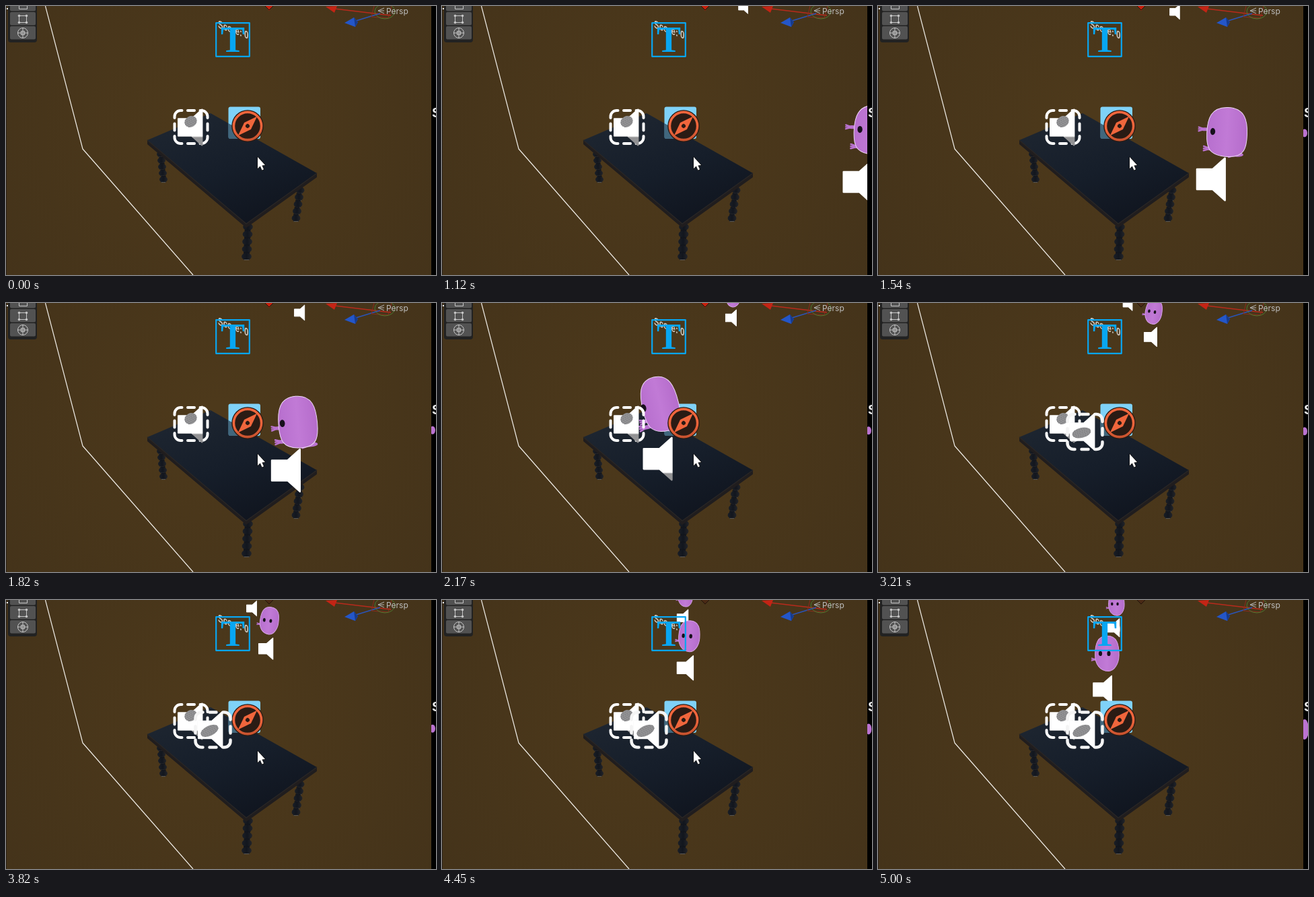
These frames come from a looping animation (639 by 399 pixels, 5060 ms). An HTML page with a canvas:

```html
<!DOCTYPE html>
<html lang="en">
<head>
<meta charset="utf-8">
<title>Scene view</title>
<style>
  html, body { margin: 0; width: 100%; height: 100%; overflow: hidden; background: #000; }
  canvas { display: block; }
</style>
</head>
<body>
<canvas id="stage" width="639" height="399"></canvas>
<script>
const W = 639, H = 399, LOOP = 5060, EDGE = 632;
const CAUGHT = 2230, CURSOR_GONE = 4500;
const SKIN = '#bb73d1', BLUE = '#08a6f2', ORANGE = '#f0663c';
const c = document.getElementById('stage').getContext('2d');

const clamp = (v, a = 0, b = 1) => Math.min(b, Math.max(a, v));
const mix = (a, b, k) => a + (b - a) * k;
const quad = (s, a, b, k) => a + b * s + k * s * s;

function trace(points, close = true) {
  c.beginPath();
  points.forEach(([x, y]) => c.lineTo(x, y));
  if (close) c.closePath();
}

function poly(points, fill) {
  trace(points);
  c.fillStyle = fill;
  c.fill();
}

function line(points, color, width = 1) {
  trace(points, false);
  c.strokeStyle = color;
  c.lineWidth = width;
  c.stroke();
}

function box(x, y, w, h, r, fill) {
  c.beginPath();
  c.roundRect(x, y, w, h, r);
  c.fillStyle = fill;
  c.fill();
}

function oval(x, y, rx, ry, fill, turn = 0) {
  c.beginPath();
  c.ellipse(x, y, rx, ry, turn, 0, 7);
  c.fillStyle = fill;
  c.fill();
}

function ring(x, y, rx, ry, color, width = 1) {
  c.beginPath();
  c.ellipse(x, y, rx, ry, 0, 0, 7);
  c.strokeStyle = color;
  c.lineWidth = width;
  c.stroke();
}

function ramp(x0, y0, x1, y1, ...stops) {
  const g = c.createLinearGradient(x0, y0, x1, y1);
  stops.forEach((s, i) => g.addColorStop(i / (stops.length - 1), s));
  return g;
}

function within(path, paint) {
  c.save();
  c.beginPath();
  path();
  c.clip();
  paint();
  c.restore();
}

// White above the cut, dimmed where the table hides it.
const dimBelow = y => ramp(0, y - 1, 0, y + 1, '#fff', '#929294');

function backdrop() {
  const g = c.createRadialGradient(320, 165, 20, 320, 200, 390);
  g.addColorStop(0, '#4d391b');
  g.addColorStop(1, '#44331a');
  c.fillStyle = g;
  c.fillRect(0, 0, EDGE, H);
  c.fillStyle = '#2a2118';
  c.fillRect(0, 0, 1, H);
  line([[58.5, 0], [114, 212], [278, 399]], '#efece6', 1.2);
}

function toolbar() {
  const ink = '#c6c6c6';
  box(3, -6, 43, 60, 4, '#222');
  for (let y = -12; y < 40; y += 21) box(6, y, 38, 19.5, 2, '#525252');
  c.strokeStyle = ink;
  c.lineWidth = 1;
  c.strokeRect(19.5, -5.5, 12, 10);
  c.strokeRect(19.5, 14.5, 11, 10);
  for (const x of [19.5, 30.5]) for (const y of [14.5, 24.5]) oval(x, y, 1.8, 1.8, ink);
  ring(25, 40, 7.5, 7.5, ink);
  line([[17, 40], [33, 40]], ink);
  line([[25, 32], [25, 48]], ink);
  c.strokeRect(22.5, 37.5, 5, 5);
  c.fillStyle = '#fff';
  c.fillRect(1, 3, 2, 2);
}

function axes(t) {
  poly([[385, 0], [397, 0], [391, 7]], t < 2300 ? '#c8200c' : '#4a2a15');
  line([[385, 0], [391, 6], [397, 0]], '#21140c');
  line([[488, 4], [572, 14]], '#b82a1c', 1.6);
  poly([[475, 1], [492, 0], [488, 10]], '#c42415');
  line([[520, 22], [556, 11]], '#2a54b8', 1.6);
  poly([[503, 25], [517, 17], [523, 24], [519, 31]], '#2456c8');
  poly([[517, 17], [523, 24], [519, 31]], '#173b8c');
  line([[547, 0], [543, 16], [568, 18], [573, 0]], '#8c2c1c');
  ring(563, 8, 15, 11, '#4d7a30');
  line([[562, 3], [553, 7], [562, 11]], '#b5b5b5');
  line([[553, 7], [562, 7]], '#b5b5b5');
  c.font = '12px Inter, Arial, sans-serif';
  c.fillStyle = '#bdbdbd';
  c.fillText('Persp', 565, 11.5);
}

// Turned leg: a leaning stack of beads, each with a worn lower rim.
function leg(x, lean, top, bottom, r) {
  const n = 5, gap = (bottom - top) / n;
  for (let i = 0; i < n; i++) {
    const bx = x + lean * i / (n - 1), y = top + gap * (i + .5);
    c.fillStyle = '#12151c';
    c.fillRect(bx - r * .55, y - gap * .6, r * 1.1, gap * 1.1);
    oval(bx, y, r * .92, gap * .48, ramp(bx - r, 0, bx + r, 0, '#1b1f26', '#12161e', '#242529'));
    line([[bx - r * .5, y + gap * .46], [bx + r * .5, y + gap * .46]], '#5f5a54');
  }
}

const TOP = [[210, 199], [304, 159], [462, 248], [357, 323]];

function table() {
  leg(230, 4, 215, 262, 6.5);
  leg(437, -6, 268, 320, 7);
  leg(359.5, -2, 322, 377, 8);
  const [left, , right, front] = TOP;
  const lower = ([x, y]) => [x, y + 6];
  c.lineJoin = 'round';
  poly([left, right, lower(right), lower(front), lower(left)], '#201d1e');
  poly(TOP, ramp(300, 160, 360, 325, '#1d2530', '#161e2a', '#10151f'));
  line([left, front, right], '#292625', 1.5);
}

function wisp(x, y, len, color) {
  oval(x, y, len, len * .35, color);
  for (const dy of [-.4, 0, .4]) {
    line([[x, y], [x - len * 1.3, y + dy * len]], color, len * .3);
  }
}

function ghost({ x, y, h, tilt = 0, w, foot, eyes, limbs, rim }) {
  c.save();
  c.translate(x, y);
  c.rotate(tilt);
  c.scale(h, h);
  c.lineCap = 'round';
  limbs.forEach(l => wisp(...l, SKIN));
  c.beginPath();
  c.moveTo(0, -.5);
  c.bezierCurveTo(w * .85, -.5, w, -.25, w, .04);
  c.bezierCurveTo(w, .3, foot, .5, .04, .5);
  c.bezierCurveTo(-foot, .5, -w, .3, -w, .04);
  c.bezierCurveTo(-w, -.25, -w * .85, -.5, 0, -.5);
  c.fillStyle = ramp(-w, 0, w, 0, '#b76fce', '#c17ad6', '#b56ccb');
  c.fill();
  c.strokeStyle = rim;
  c.lineWidth = 1 / h;
  c.stroke();
  eyes.forEach(e => oval(e, 0, .05, .07, '#17101c'));
  c.restore();
}

function speaker(x, y, h, fill = '#fff') {
  const half = [[.02, -.23], [.38, -.23], [.66, -.48]];
  const whole = [...half, ...half.map(([a, b]) => [a, -b]).reverse()];
  c.save();
  c.fillStyle = c.strokeStyle = fill;
  c.lineJoin = 'round';
  c.lineWidth = h * .04;
  trace(whole.map(([a, b]) => [x + a * h, y + b * h]));
  c.shadowColor = 'rgba(0,0,0,.35)';
  c.shadowBlur = 2;
  c.fill();
  c.shadowColor = 'transparent';
  c.stroke();
  c.restore();
}

function dashedFrame(x, y, r, paint, width = 4) {
  c.save();
  c.translate(x, y);
  c.lineCap = 'round';
  c.lineWidth = width;
  c.strokeStyle = paint;
  c.beginPath();
  for (const [a, b] of [[1, 1], [-1, 1], [1, -1], [-1, -1]]) {
    c.moveTo(a * r, b * (r - 11));
    c.arcTo(a * r, b * r, a * (r - 11), b * r, 9);
    c.lineTo(a * (r - 11), b * r);
  }
  for (const side of [-r, r]) {
    c.moveTo(-5, side);
    c.lineTo(5, side);
    c.moveTo(side, -5);
    c.lineTo(side, 5);
  }
  c.stroke();
  c.restore();
}

function scribble(x, y, rx, ry, turn) {
  c.save();
  c.translate(x, y);
  c.rotate(turn);
  oval(0, 0, rx, ry, '#929294');
  c.setLineDash([2, 1.5]);
  for (let i = -2; i <= 2; i++) {
    const half = rx * Math.sqrt(1 - i * i / 9);
    line([[-half, i * ry / 3], [half, i * ry / 3]], '#77777a', .8);
  }
  c.restore();
}

function bluePanel() {
  within(() => c.roundRect(330.5, 149.5, 47.5, 47.5, 3), () => {
    c.fillStyle = '#7fd2f8';
    c.fillRect(330, 149, 49, 49);
    poly(TOP, 'rgba(24,32,44,.6)');
  });
}

function compass() {
  c.save();
  c.translate(359, 178);
  oval(0, 0, 23.8, 23.8, '#2a1b14');
  ring(0, 0, 20.6, 20.6, ramp(-8, -18, -3, 22, ORANGE, ORANGE, '#c9532f'), 3.6);
  c.rotate(-Math.PI / 4);
  poly([[-20, 0], [0, -7], [20, 0], [0, 7]], ORANGE);
  oval(0, 0, 3, 3, '#2b1a14');
  c.restore();
}

function scoreLabel() {
  c.save();
  c.transform(.72, .27, 0, 1, 315, 32);
  c.font = 'bold 16px "Liberation Sans", Arial, sans-serif';
  c.fillStyle = '#cfcbc4';
  c.fillText('Score: 0', 0, 0);
  c.restore();
}

function textIcon() {
  c.strokeStyle = c.fillStyle = BLUE;
  c.lineWidth = 2.2;
  c.strokeRect(312.2, 25.2, 49.6, 49.6);
  c.font = 'bold 54px "Liberation Serif", Times, serif';
  c.textAlign = 'center';
  c.fillText('T', 337, 67.5);
  c.textAlign = 'left';
}

// Steady approach in depth: size is the inverse of distance, and place follows size.
function walker(t, lag, x0, lane) {
  const h = 1 / (.0372 - .0058 * (t / 1000 - 2.65 - lag));
  return { x: x0 - lane * h, y: 6.36 * h - 137, h };
}

function walkerGhost({ x, y, h }, tilt) {
  ghost({
    x: x + h * .5, y: y - h * 1.26, h: h * 1.23, tilt, w: .34, foot: .2,
    eyes: [-.19, .05], limbs: [[-.32, .17, .09]], rim: '#d5a2e3'
  });
}

function nearGhost(s) {
  const turn = clamp(s / .63);
  ghost({
    x: quad(s, 519, -300, -14), y: quad(s, 187, -19, -63), h: mix(73, 82, turn),
    tilt: mix(.04, -.24, turn), w: mix(.41, .33, turn), foot: mix(.38, .3, turn),
    eyes: [mix(-.29, -.31, turn)],
    limbs: [[mix(-.45, -.3, turn), mix(-.04, .24, turn), .1], [-.32, .35, .11], [.22, .45, .13]],
    rim: '#ecd6f3'
  });
}

function sidePane(t) {
  const flash = t > CAUGHT ? clamp(1 - (t - CAUGHT) / 650) : 0;
  within(() => c.rect(EDGE, 0, W - EDGE, H), () => {
    c.fillStyle = `rgb(${110 * flash},0,${6 * flash})`;
    c.fillRect(EDGE, 0, W - EDGE, H);
    c.fillStyle = '#000';
    c.fillRect(EDGE, 0, 1.5, H);
    const grow = clamp((t - 4300) / 700);
    if (t > 1400) oval(634, 187 + t / 1000, 4 + grow * 2, 6 + grow * 9, SKIN);
    c.font = 'bold 20px "Liberation Sans", Arial, sans-serif';
    c.fillStyle = '#eee';
    c.fillText('S', 633, 165);
  });
}

function cursor() {
  trace([[374, 224], [374, 241], [377.8, 237.5], [380.5, 243.5], [383, 242.3], [380.4, 236.6], [385, 236]]);
  c.lineJoin = 'round';
  c.strokeStyle = '#111';
  c.lineWidth = 1.6;
  c.stroke();
  c.fillStyle = '#fff';
  c.fill();
}

function actors(t) {
  const mid = walker(t, 0, 567, 5.84), far = walker(t, 2.09, 444, 3.7);
  const s = (t - 1540) / 1000, loose = t > 900 && t < CAUGHT;

  scoreLabel();
  walkerGhost(far, 0);
  speaker(far.x, far.y, far.h);
  walkerGhost(mid, .2 * Math.sin(Math.PI * clamp(t / LOOP)));
  textIcon();
  speaker(mid.x, mid.y, mid.h);
  bluePanel();
  if (loose) nearGhost(s);
  compass();

  dashedFrame(275, 179.5, 24.5, dimBelow(188));
  speaker(255, 180, 55, dimBelow(194));
  scribble(274.5, 171.5, 9.5, 8, -.5);
  if (loose) {
    const y = quad(s, 257, -22, -30);
    speaker(quad(s, 473, -286, 15), y, 65, s > .4 ? dimBelow(y + 21) : '#fff');
  } else if (t >= CAUGHT) {
    const k = clamp((t - 2650) / 1100), y = mix(189.5, 192.5, k);
    dashedFrame(307.5, y, 26, '#f4f4f4', 4.5);
    speaker(285, y, 55);
    scribble(302.5, y + 1.5, 14, 7.5, -.45 * k);
  }
}

function draw(t) {
  c.clearRect(0, 0, W, H);
  backdrop();
  table();
  axes(t);
  within(() => c.rect(0, 0, EDGE, H), () => actors(t));
  toolbar();
  sidePane(t);
  if (t < CURSOR_GONE) cursor();
}

const start = performance.now();
function tick() {
  draw((performance.now() - start) % LOOP);
  requestAnimationFrame(tick);
}
tick();
</script>
</body>
</html>
```
